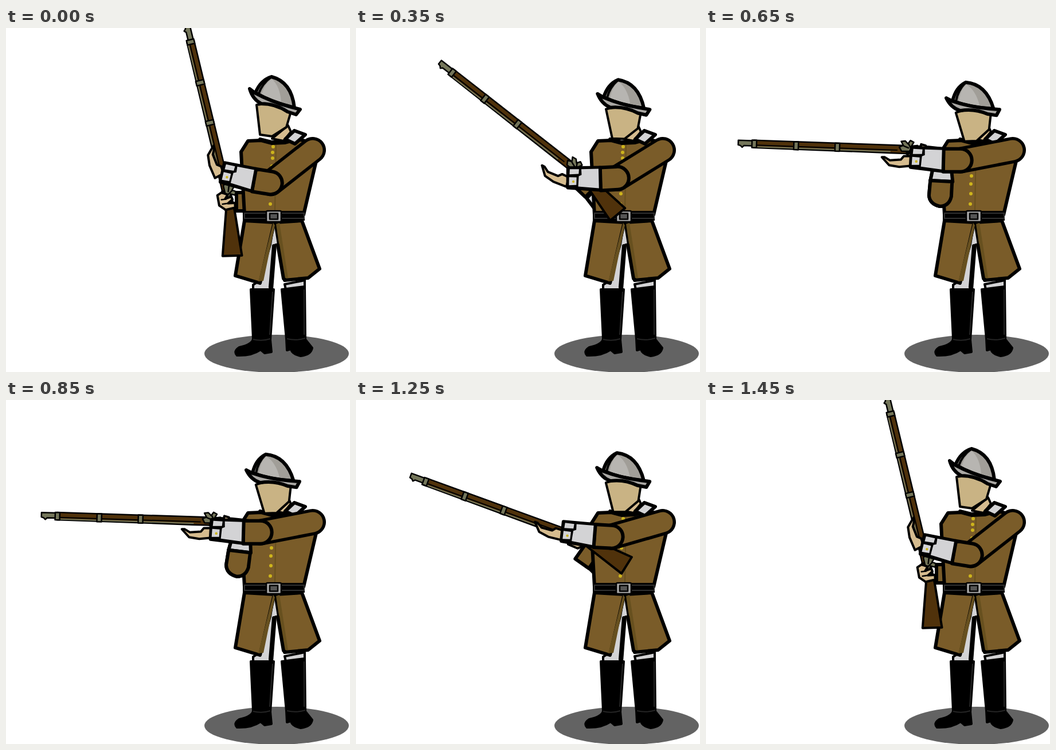
These frames come from a looping animation (600x600 px, 2 s). An HTML page without scripts:

```html
<!DOCTYPE html>
<html lang="en">
<head>
<meta charset="utf-8">
<title>Musketeer drill</title>
<style>
  @property --head { syntax: "<angle>"; inherits: true; initial-value: 0deg }
  @property --gun { syntax: "<angle>"; inherits: true; initial-value: 0deg }
  @property --gun-x { syntax: "<length>"; inherits: true; initial-value: 0px }
  @property --gun-y { syntax: "<length>"; inherits: true; initial-value: 0px }
  @property --arm { syntax: "<angle>"; inherits: true; initial-value: 0deg }
  @property --fore { syntax: "<angle>"; inherits: true; initial-value: 0deg }
  @property --hand { syntax: "<angle>"; inherits: true; initial-value: 0deg }
  @property --rear { syntax: "<angle>"; inherits: true; initial-value: 0deg }
  @property --rear-x { syntax: "<length>"; inherits: true; initial-value: 0px }
  @property --rear-y { syntax: "<length>"; inherits: true; initial-value: 0px }
  @property --near { syntax: "<number>"; inherits: true; initial-value: 0 }

  html, body { margin: 0; width: 100%; height: 100%; overflow: hidden; background: #fff }
  svg { display: block; width: 100%; height: 100%; animation: drill 2s steps(2) infinite }

  /* One pose per stop; each segment advances in 50 ms steps. */
  @keyframes drill {
    0%, 72.5%, 100% { --head: 0deg; --gun: 76.4deg; --gun-x: 384px; --gun-y: 283px; --arm: -38deg; --fore: 47deg; --hand: 53deg; --rear: -90deg; --rear-x: 477px; --rear-y: 303px; --near: -1 }
    5% { --head: -.6deg; --gun: 72deg; --gun-x: 385px; --gun-y: 279px; --arm: -38deg; --fore: 45deg; --hand: 50deg; --rear: -87deg; --rear-x: 477px; --rear-y: 305px; --near: -1 }
    10% { --head: -2.5deg; --gun: 61.2deg; --gun-x: 386px; --gun-y: 268px; --arm: -38deg; --fore: 38deg; --hand: 40deg; --rear: -78deg; --rear-x: 478px; --rear-y: 311px; --near: -1; animation-timing-function: steps(5) }
    22.5% { --head: -7.5deg; --gun: 22.5deg; --gun-x: 371px; --gun-y: 225px; --arm: -27.5deg; --fore: 22.5deg; --hand: 5deg; --rear: -25deg; --rear-x: 422px; --rear-y: 318px; --near: 0 }
    27.5% { --head: -9deg; --gun: 10.5deg; --gun-x: 360px; --gun-y: 216px; --arm: -18deg; --fore: 16deg; --hand: -4deg; --rear: -10deg; --rear-x: 414px; --rear-y: 303px; --near: 2 }
    32.5% { --head: -10deg; --gun: 2deg; --gun-x: 350px; --gun-y: 212px; --arm: -11deg; --fore: 11deg; --hand: -10deg; --rear: 3deg; --rear-x: 409px; --rear-y: 291px; --near: 2; animation-timing-function: steps(5) }
    45% { --head: -10deg; --gun: 1.8deg; --gun-x: 357px; --gun-y: 211.5px; --arm: -11deg; --fore: 11deg; --hand: -10deg; --rear: 8deg; --rear-x: 403px; --rear-y: 287px; --near: 2; animation-timing-function: steps(3) }
    52.5% { --head: -10deg; --gun: 2deg; --gun-x: 354.5px; --gun-y: 211px; --arm: -11deg; --fore: 11deg; --hand: -10deg; --rear: 7deg; --rear-x: 405px; --rear-y: 288px; --near: 2 }
    57.5% { --head: -10deg; --gun: 2.5deg; --gun-x: 349px; --gun-y: 212px; --arm: -11deg; --fore: 11deg; --hand: -10deg; --rear: 0deg; --rear-x: 408px; --rear-y: 290px; --near: 1 }
    62.5% { --head: -7.5deg; --gun: 20deg; --gun-x: 371px; --gun-y: 234px; --arm: -16deg; --fore: 19deg; --hand: 6deg; --rear: -55deg; --rear-x: 453px; --rear-y: 307px; --near: -1 }
    67.5% { --head: -2.6deg; --gun: 57deg; --gun-x: 384px; --gun-y: 266px; --arm: -31deg; --fore: 38deg; --hand: 40deg; --rear: -80deg; --rear-x: 472px; --rear-y: 306px; --near: -1 }
  }

  .head { transform-origin: 514px 148px; transform: rotate(var(--head)) }
  .gun { transform: translate(var(--gun-x), var(--gun-y)) rotate(var(--gun)) }
  .arm { transform: translate(535px, 213px) rotate(var(--arm)) }
  .fore { transform: translate(-93px, 0) rotate(var(--fore)) }
  .hand { transform: translate(-88px, -4px) rotate(var(--hand)) }
  .rear { transform: translate(var(--rear-x), var(--rear-y)) rotate(var(--rear)) }
  .near { opacity: var(--near) }

  .ink { stroke: #000; stroke-width: 6; stroke-linejoin: round; stroke-linecap: round }
  .thin { stroke-width: 4 }
  .fine { stroke-width: 2.5 }
  .coat { fill: #7a5c29 }
  .fold { fill: #67501f }
  .linen { fill: #d3d3d5 }
  .skin { fill: #d6bc8f }
  .wood { fill: #50320b }
  .metal { fill: #74765a }
  .brass { fill: #cdb41c }
  .line { fill: none }
</style>
</head>
<body>
<svg viewBox="0 0 600 600">
  <defs>
    <g id="sleeve">
      <path class="coat ink" d="M-16-75H16V-46H-16Z"/>
      <path class="linen ink" d="M-16-43H17L20-24H-19Z"/>
      <path class="coat ink" d="M-19-24H19V2Q16 19 0 20Q-18 17-20 2Z"/>
    </g>
  </defs>

  <ellipse cx="472" cy="568" rx="126" ry="33" fill="#636363"/>

  <g id="legs">
    <path class="linen ink thin" d="M467 340L461 378L443 440L431 448V456H464L470 378H478L475 340Z"/>
    <path class="linen ink thin" d="M486 447L521 440V453L488 456Z"/>
    <path class="ink thin" d="M427 456H467L461 544L463 565L451 567L444 561Q428 572 403 571Q396 564 407 557Q430 552 431 542Z"/>
    <path class="ink thin" d="M481 456L521 451L522 543L534 558Q532 570 514 572Q499 569 497 560L490 562L489 542Z"/>
    <path class="line" d="M431 543Q446 547 461 542M490 542Q506 546 522 541M465 460L460 535M520 456V535" stroke="#252525" stroke-width="2"/>
  </g>

  <g class="rear"><use href="#sleeve"/></g>

  <g id="body">
    <path class="coat ink" d="M422 197L445 196L464 201L486 200L508 194L536 200L541 232L519 326H416L410 216Z"/>
    <path class="coat ink" d="M416 336L400 432L443 445L468 339Z"/>
    <path class="coat ink" d="M470 339L486 440L527 436L547 420L516 336Z"/>
    <path class="fold" d="M466 340L440 442L449 441L469 344ZM471 342L485 436L492 436L477 340Z"/>
    <path class="line" d="M471 204L469 318" stroke="#67501f" stroke-width="2"/>
    <path class="line ink" d="M467 380L461 452M474 378L484 437"/>
    <g class="brass">
      <circle cx="466" cy="207" r="3"/><circle cx="465" cy="217" r="3"/>
      <circle cx="465" cy="227" r="3"/><circle cx="464" cy="241" r="3"/>
      <circle cx="463" cy="258" r="3"/><circle cx="462" cy="272" r="3"/>
      <circle cx="462" cy="289" r="3"/><circle cx="461" cy="307" r="3"/>
    </g>
    <path d="M413 319H521V336H413Z"/>
    <path class="line" d="M416 323H520V332H416Z" stroke="#303030" stroke-width="2"/>
    <rect class="ink fine" x="454" y="319" width="26" height="19" rx="2" fill="#a5a5a5"/>
    <rect class="ink fine" x="460" y="323.5" width="14" height="10" fill="#555"/>
  </g>

  <g id="collar">
    <path class="skin ink thin" d="M464 193L492 170L497 181L484 197Z"/>
    <path class="linen ink" d="M487 194L503 179L522 186L504 202Z"/>
    <path class="line ink" d="M443 194L463 199L484 199"/>
  </g>

  <g class="head">
    <path class="ink thin" fill="#c9b384" d="M437 134L443 186L464 189L489 173L497 146L470 130Z"/>
    <path class="ink" fill="#a19e98" d="M435 113Q444 91 463 85Q498 94 503 139Q465 130 435 113Z"/>
    <path fill="#b7b5b1" d="M446 115Q452 95 464 89Q478 102 480 129Q460 123 446 115Z"/>
    <path class="line ink thin" d="M441 114Q447 97 462 86"/>
    <path class="ink" fill="#aaa8a4" d="M425 106L434 113Q463 129 498 138L513 142L506 151L491 146Q470 132 445 132Q430 124 425 106Z"/>
  </g>

  <g class="near"><g class="rear"><use href="#sleeve"/></g></g>

  <g class="gun">
    <path class="wood ink thin" d="M0-6L38-6L117 0L110 33L36 9L0 7Z"/>
    <path class="metal ink fine" d="M-294-6H-266V3H-284L-287 6L-290 3L-294 2Z"/>
    <path class="wood ink fine" d="M-267-7H0V7H-30L-267 6Z"/>
    <path class="line" d="M-262 1.5H-16" stroke="#000" stroke-width="2"/>
    <path class="line" d="M-262 4.5H-28" stroke="#74765a" stroke-width="2"/>
    <path class="metal ink fine" d="M-270-7h8v13h-8ZM-197-7h8v14h-8ZM-125-7h8v14h-8Z"/>
    <path class="metal ink fine" d="M-13-4L-6-7L-10-14L-3-15L2-10L6-16L12-13L8-6L15-2L6 3H-9Z"/>
    <path class="line ink fine" d="M-5-6L3-3M3-10L7-3"/>
    <path class="skin ink thin" d="M2 9L5 17L23 18L33 9L33-8L25-10L23 2L18-7L13-6L14 5L8-1Z"/>
    <path class="line ink fine" d="M15 4L14 12M23 2L22 12"/>
  </g>

  <g class="arm">
    <path class="line ink" d="M0 0H-93" style="stroke-width:46"/>
    <path class="line" d="M0 0H-93" stroke="#7a5c29" stroke-width="35" stroke-linecap="round"/>
    <g class="fore">
      <g class="hand">
        <path class="skin ink thin" d="M-48-10L-43-9L-35-2L-16 0L-10-5L3-3V14L-21 12L-38 6Z"/>
      </g>
      <path class="coat ink" d="M-30-20H0A20 20 0 0 1 0 20H-30Z"/>
      <path class="ink" d="M-85-22L-29-20L-30 19L-87 12Z"/>
      <path class="linen" d="M-62-19L-32-18L-33 16L-69 11L-67-7L-62-9ZM-82-20L-66-19L-67-11L-83-11ZM-84-6L-71-5L-72 8L-85 8Z"/>
      <circle class="brass" cx="-77" cy="2" r="2.2"/>
    </g>
  </g>
</svg>
</body>
</html>
```
